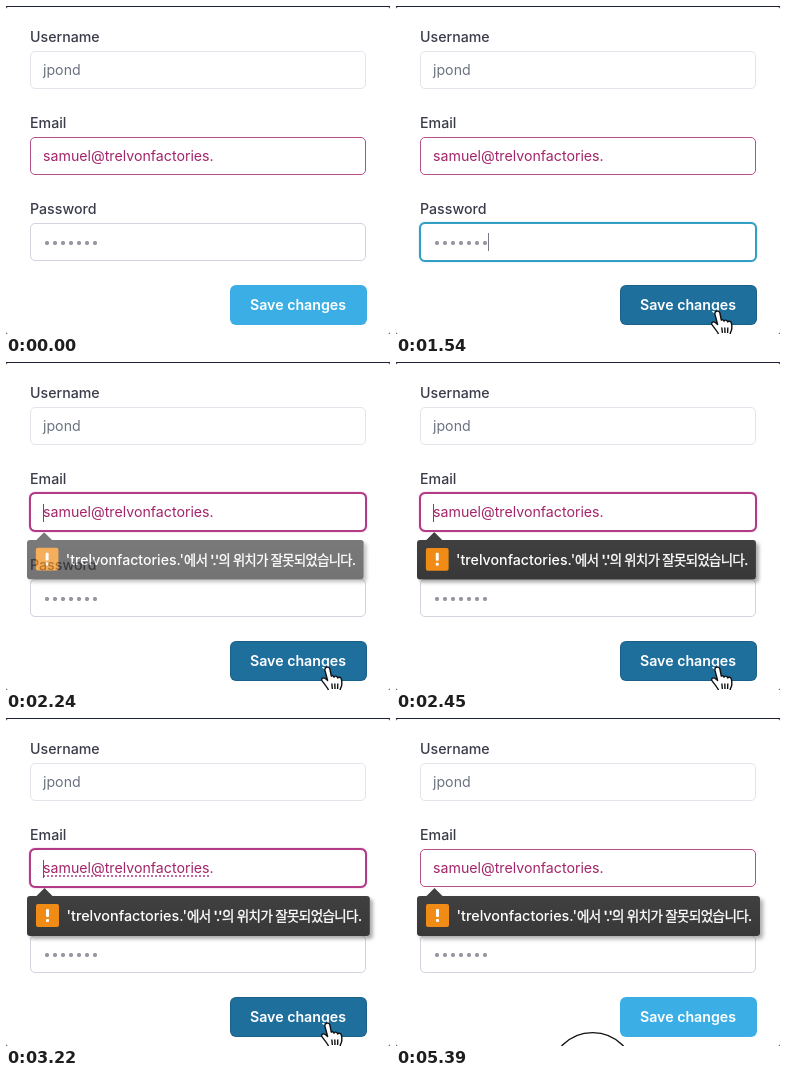
Recreate the animation shown at these times as an HTML page. Size 384 px wide and 328 px high, loop 5.46 s.

```html
<!DOCTYPE html>
<html lang="en">
<head>
<meta charset="utf-8">
<title>Form validation</title>
<style>
  :root { --loop: 5.46s infinite step-end; }
  html, body { margin: 0; width: 100%; height: 100%; overflow: hidden; background: #1c2136; }
  .stage {
    position: relative; width: 384px; height: 328px; overflow: hidden;
    font: 400 14.2px/20px Inter, "Open Sans", sans-serif;
  }
  .stage *, .ring::after { position: absolute; box-sizing: border-box; white-space: nowrap; }
  .card { inset: 1px 0 0; background: #fff; border-radius: 2px; }

  label { left: 24px; color: #3a3c4a; font-weight: 500; }
  .field {
    left: 24px; width: 336px; height: 38px; padding: 9px 12px;
    border: 1px solid #e3e5ec; border-radius: 5px; background: #fff; color: #6b7280;
  }
  .email { border-color: #b3508a; color: #a3246a; }
  .password { border-color: #d2d3dc; }
  .field span { left: 12px; top: 8px; }
  .ring { inset: -2px; border: 2px solid; border-radius: 6px; box-shadow: 0 0 1px; opacity: 0; }
  .email .ring { color: #b23a86; animation: emailFocus var(--loop); }
  .password .ring { color: #319fc3; animation: passFocus var(--loop); }
  .caret { width: 1px; height: 18px; opacity: 0; }
  .email .caret { left: 12px; top: 10px; background: #8c3a66; animation: emailCaret var(--loop); }
  .password .caret { left: 67px; top: 9px; background: #777985; animation: passCaret var(--loop); }
  .dots {
    left: 12px; top: 15px; width: 56px; height: 8px;
    background: radial-gradient(circle, #9899a4 1.7px, transparent 2.5px) 0 0 / 8px 8px;
  }
  .field .spell {
    left: 0; top: 17px; width: 100%; height: 1.5px; opacity: 0;
    background: repeating-linear-gradient(90deg, #c466a0 0 2px, transparent 2px 4px);
    animation: spell var(--loop);
  }
  button {
    left: 223.5px; top: 279px; width: 137px; height: 40px; padding: 0; border: 0; border-radius: 6px;
    background: #3bafe5; color: #fff; font: 600 14.2px/40px Inter, "Open Sans", sans-serif;
    animation: hover var(--loop);
  }

  .tip { left: 20.5px; top: 178px; opacity: 0; animation: fade var(--loop); }
  .bubble {
    width: 343px; height: 40px; transform-origin: 0 0; border-radius: 3px; color: #fff;
    background: linear-gradient(#404040, #383838); box-shadow: 3px 3px 4px #0005;
    animation: grow var(--loop);
  }
  .arrow { left: 8.5px; top: -8px; width: 18px; height: 9px; background: #404040; clip-path: polygon(50% 0, 100% 100%, 0 100%); }
  .icon { left: 8.5px; top: 8px; width: 23px; height: 23px; border-radius: 2px; background: #f08c16; }
  .icon::before, .icon::after { content: ""; position: absolute; left: 10px; width: 3px; background: #fff; border-radius: 1px; }
  .icon::before { top: 5px; height: 8px; }
  .icon::after { top: 15px; height: 3px; }
  .bubble p {
    left: 39.5px; top: 10px; margin: 0; letter-spacing: -.6px; -webkit-text-stroke: .35px #fff;
    font: 500 13.5px/20px Inter, "Noto Sans CJK KR", "Noto Sans CJK", sans-serif;
  }
  .bubble b { position: static; font-size: 14.4px; font-weight: 500; letter-spacing: 0; -webkit-text-stroke: 0; }

  svg { left: 0; top: 0; overflow: visible; fill: #fff; stroke: #111; stroke-width: 1.4; stroke-linejoin: round; }
  .pointer { width: 24px; height: 29px; transform: translateY(-60px); }
  .arrowCursor { fill: #111; stroke: #fff; animation: arrowMove var(--loop); }
  .beam { animation: beamMove var(--loop); }
  .hand { animation: handMove var(--loop); }
  .disc { opacity: 0; animation: disc var(--loop); }

  @keyframes passFocus { 8.97% { opacity: 1; } 33.33% { opacity: 0; } }
  @keyframes passCaret {
    10.25%, 28.2% { opacity: 1; }
    19.23%, 33.33% { opacity: 0; }
  }
  @keyframes emailFocus { 37.17% { opacity: 1; } 98.71% { opacity: 0; } }
  @keyframes emailCaret {
    37.17%, 57.69%, 76.92%, 96.15% { opacity: 1; }
    47.43%, 66.66%, 85.89%, 98.71% { opacity: 0; }
  }
  @keyframes spell { 57.69% { opacity: 1; } 98.71% { opacity: 0; } }
  @keyframes hover {
    15.38% { background: #1f6f9d; box-shadow: inset 0 0 0 1px #0002; }
    98.71% { background: #3bafe5; box-shadow: none; }
  }
  @keyframes fade {
    37.17% { opacity: .25; animation-timing-function: steps(5); }
    43.58%, 100% { opacity: 1; }
  }
  @keyframes grow {
    0%, 37.17% { transform: scale(.975); animation-timing-function: steps(10); }
    50% { transform: scale(.997); animation-timing-function: steps(8); }
    60.25%, 100% { transform: none; }
  }
  @keyframes arrowMove {
    1.28% { transform: translate(204px, 300px); }
    2.56% { transform: translateY(-60px); }
    10.25% { transform: translate(344px, 273px); }
    14.1% { transform: translate(365px, 287px); }
    15.38% { transform: translateY(-60px); }
  }
  @keyframes beamMove {
    2.56% { transform: translate(296px, 232px); }
    3.84% { transform: translate(338px, 229px); }
    10.25% { transform: translateY(-60px); }
  }
  @keyframes handMove {
    15.38% { transform: translate(340px, 283px); }
    16.66% { transform: translate(340px, 284px); }
    19.23% { transform: translate(337px, 289px); }
    20.51% { transform: translate(328px, 297px); }
    21.79% { transform: translate(318px, 303px); }
    23.07% { transform: translate(314px, 304px); }
    73.07% { transform: translate(300px, 312px); }
    74.35% { transform: translate(279px, 324px); }
    75.64% { transform: translateY(-60px); }
  }
  @keyframes disc { 98.71%, 100% { opacity: 1; } }
</style>
</head>
<body>
<div class="stage">
  <div class="card"></div>

  <label style="top:21px">Username</label>
  <div class="field" style="top:45px"><span>jpond</span></div>

  <label style="top:107px">Email</label>
  <div class="field email" style="top:131px">
    <div class="ring"></div>
    <span>samuel@trelvonfactories<i class="spell"></i></span>
    <span><b style="position:static;visibility:hidden;font-weight:400">samuel@trelvonfactories</b>.</span>
    <div class="caret"></div>
  </div>

  <label style="top:193px">Password</label>
  <div class="field password" style="top:217px">
    <div class="ring"></div>
    <div class="dots"></div>
    <div class="caret"></div>
  </div>

  <button type="button">Save changes</button>

  <div class="tip">
    <div class="bubble">
      <div class="arrow"></div>
      <div class="icon"></div>
      <p lang="ko"><b>'trelvonfactories.'</b>에서 '.'의 위치가 잘못되었습니다.</p>
    </div>
  </div>

  <svg class="disc" width="384" height="328"><circle cx="196.5" cy="357" r="42.4"/></svg>
  <svg class="pointer arrowCursor"><path d="M1 1V23L6 18.5L9.5 27L13.5 25.3L10 17H17Z"/></svg>
  <svg class="pointer beam"><path fill="none" d="M2 1Q5 1 5 4V16Q5 19 2 19M8 1Q5 1 5 4M5 16Q5 19 8 19"/></svg>
  <svg class="pointer hand">
    <path d="M7.6 1C5.6 1 4.6 2.6 5 4.4L7.6 14.5 5 12.3C3.2 11.2 1 12.4 1.8 14.3C3 16.4 6 19.5 8 23L9.5 27.5H19.5L20.5 22.5C22 20 22.2 17 21.5 13.5C21 11 18.5 10.6 17.8 12C17 9.8 14.6 9.6 14 11.2C13.2 9.4 11.8 9 11.3 10.2L9.9 3C9.6 1.8 8.8 1 7.6 1Z"/>
    <path d="M11.8 17.5L12.4 23M14.8 17.5L15 23M17.8 17.5L17.6 23"/>
  </svg>
</div>
</body>
</html>
```
